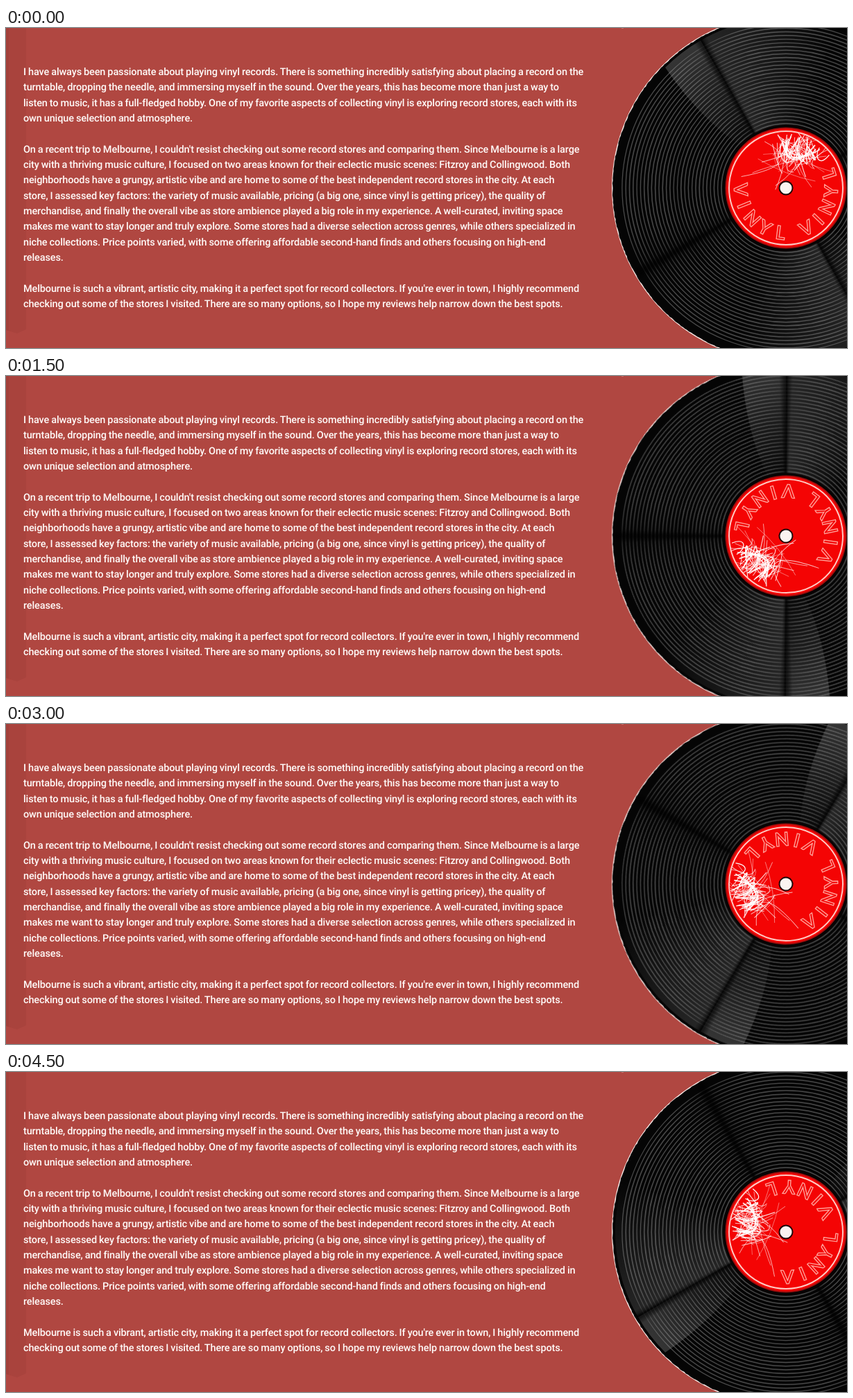
An HTML page with a canvas that plays this animation: 1212 by 462 pixels, repeating every 5000 ms.

```html
<!DOCTYPE html>
<html lang="en">
<head>
<meta charset="utf-8">
<title>Vinyl records</title>
<style>
  html, body { margin: 0; width: 100%; height: 100%; overflow: hidden; background: #b04741; }
  #stage { position: relative; width: 1212px; height: 462px; overflow: hidden; background: #b04741; }
  #page { position: absolute; left: 0; top: 0; }
  #copy text {
    font: 500 14.5px Roboto, "Liberation Sans", sans-serif;
    letter-spacing: -0.14px;
    word-spacing: -0.4px;
    text-rendering: geometricPrecision;
    fill: #fffaf8;
  }
  #disc { position: absolute; left: 871.5px; top: -21px; width: 504px; height: 504px; transform-origin: 252px 252px; }
  #disc > * { position: absolute; left: 0; top: 0; }
  #label text { font: 700 27px Lato, "Open Sans", sans-serif; fill: none; stroke: #ffa098; stroke-width: 1.4px; text-anchor: middle; }
</style>
</head>
<body>
<div id="stage">
  <svg id="page" width="1212" height="462">
    <path d="M0 0H29V435L16 441L0 436Z" fill="#a9433d"/>
    <path d="M0 0H4V437L0 436Z" fill="#a2403a"/>
    <path d="M887 0h3" stroke="#d99a94"/>
    <g id="copy"></g>
  </svg>
  <div id="disc">
    <canvas id="vinyl" width="504" height="504"></canvas>
    <svg id="label" width="504" height="504" viewBox="-252 -252 504 504">
      <clipPath id="inside"><circle r="82"/></clipPath>
      <circle r="87.5" fill="#a80c0c"/>
      <circle r="85.5" fill="#f40404"/>
      <g id="scratches" clip-path="url(#inside)" fill="none" stroke="#fff" stroke-linecap="round"></g>
      <circle r="82" fill="none" stroke="#ffc9c2" stroke-width="2"/>
      <g id="letters"></g>
      <circle r="10.5" fill="#1c0505"/>
      <circle r="8.6" fill="#fbf3f0"/>
    </svg>
  </div>
</div>
<script>
const LOOP = 5000, STEP = 500;
const RAD = Math.PI / 180;
const NS = "http://www.w3.org/2000/svg";
const $ = id => document.getElementById(id);

const COPY = `I have always been passionate about playing vinyl records. There is something incredibly satisfying about placing a record on the
turntable, dropping the needle, and immersing myself in the sound. Over the years, this has become more than just a way to
listen to music, it has a full-fledged hobby. One of my favorite aspects of collecting vinyl is exploring record stores, each with its
own unique selection and atmosphere.

On a recent trip to Melbourne, I couldn't resist checking out some record stores and comparing them. Since Melbourne is a large
city with a thriving music culture, I focused on two areas known for their eclectic music scenes: Fitzroy and Collingwood. Both
neighborhoods have a grungy, artistic vibe and are home to some of the best independent record stores in the city. At each
store, I assessed key factors: the variety of music available, pricing (a big one, since vinyl is getting pricey), the quality of
merchandise, and finally the overall vibe as store ambience played a big role in my experience. A well-curated, inviting space
makes me want to stay longer and truly explore. Some stores had a diverse selection across genres, while others specialized in
niche collections. Price points varied, with some offering affordable second-hand finds and others focusing on high-end
releases.

Melbourne is such a vibrant, artistic city, making it a perfect spot for record collectors. If you're ever in town, I highly recommend
checking out some of the stores I visited. There are so many options, so I hope my reviews help narrow down the best spots.`;

function add(parent, tag, attrs, text) {
  const el = document.createElementNS(NS, tag);
  for (const k in attrs) el.setAttribute(k, attrs[k]);
  if (text) el.textContent = text;
  parent.appendChild(el);
  return el;
}

function seeded(s) {
  return () => (s = (s * 16807) % 2147483647) / 2147483647;
}

function drawCopy() {
  COPY.split("\n").forEach((line, i) => {
    if (line) add($("copy"), "text", { x: 25, y: (68 + i * 22.33).toFixed(2) }, line);
  });
}

function drawVinyl() {
  const g = $("vinyl").getContext("2d");
  const rand = seeded(41);
  g.translate(252, 252);

  // stops: [degrees, alpha]
  const conic = (shade, stops) => {
    const fill = g.createConicGradient(0, 0, 0);
    for (const [deg, a] of stops) fill.addColorStop(deg / 360, `rgba(${shade},${shade},${shade},${a})`);
    return fill;
  };
  const disc = (r, fill) => {
    g.beginPath();
    g.arc(0, 0, r, 0, 7);
    g.fillStyle = fill;
    g.fill();
  };

  // slightly ragged white rim
  disc(251, "#f6e9e6");
  g.beginPath();
  for (let a = 0; a < 360; a += 0.8) {
    const r = 249.4 + rand() * 0.9;
    g.lineTo(r * Math.cos(a * RAD), r * Math.sin(a * RAD));
  }
  g.fillStyle = "#050505";
  g.fill();

  // grooves, dimmer towards the four dark bands
  const dips = [[0, .45]];
  for (const mid of [60, 150, 240, 330])
    dips.push([mid - 14, .45], [mid - 5, .34], [mid, .18], [mid + 5, .34], [mid + 14, .45]);
  g.strokeStyle = conic(155, [...dips, [360, .45]]);
  for (let r = 93; r < 238; r += 5.3) {
    g.lineWidth = 1.2 + 0.5 * rand();
    g.beginPath();
    g.arc(0, 0, r, 0, 7);
    g.stroke();
  }

  // two opposite sheens with a curved leading edge
  const polar = (r, deg) => [r * Math.cos(deg * RAD), r * Math.sin(deg * RAD)];
  const fade = g.createRadialGradient(0, 0, 90, 0, 0, 246);
  fade.addColorStop(0, "rgba(190,190,190,.02)");
  fade.addColorStop(.5, "rgba(190,190,190,.13)");
  fade.addColorStop(1, "rgba(190,190,190,.26)");
  for (const start of [45, 225]) {
    g.beginPath();
    g.moveTo(...polar(246, start));
    g.quadraticCurveTo(...polar(160, start - 6), ...polar(90, start - 2));
    g.lineTo(...polar(90, start + 15));
    g.arc(0, 0, 246, (start + 15) * RAD, start * RAD, true);
    g.fillStyle = fade;
    g.fill();
  }
  disc(246, conic(190, [
    [0, 0], [60, 0], [61, .18], [80, .11], [108, 0], [240, 0], [241, .18], [260, .11], [288, 0], [360, 0]
  ]));

  // dark bands
  const bands = [[0, 0]];
  for (const mid of [60, 150, 240, 330])
    bands.push([mid - 2.5, 0], [mid - .5, .55], [mid + .5, .55], [mid + 2.5, 0]);
  disc(248, conic(0, [...bands, [360, 0]]));
  disc(91, "#080404");
}

function drawLetters() {
  const angles = [178, 158, 138, 118, 97, 63, 44, 25, 4, -18];
  angles.forEach((a, i) => {
    add($("letters"), "text", { y: 9.7, transform: `rotate(${a - 90}) translate(0 65)` }, "VINYL"[i % 5]);
  });
}

function drawScratches() {
  const rand = seeded(977);
  const near = (mid, spread) => mid + (rand() - rand()) * spread;
  const stroke = (d, w, o) => add($("scratches"), "path", { d, "stroke-width": w.toFixed(2), opacity: o.toFixed(2) });

  // loose fine hairs
  for (let i = 0; i < 34; i++) {
    const x = near(12, 62), y = near(-66, 22);
    stroke(`M${x} ${y}Q${near(10, 50)} ${near(-46, 28)} ${near(x - 8, 46)} ${near(-28, 30)}`, .5 + rand() * .7, .45 + rand() * .4);
  }
  // dense looping core
  for (let i = 0; i < 18; i++) {
    const x = near(20, 44), y = near(-68, 16);
    stroke(`M${x} ${y}C${near(x - 6, 34)} ${near(-44, 24)} ${near(x + 10, 34)} ${near(-34, 20)} ${near(24, 42)} ${near(-60, 24)}`,
      .9 + rand() * 1.2, .7 + rand() * .3);
  }
  stroke("M-6 -72Q4 -40 -15 2", .9, .75);
  stroke("M-48 -22Q-10 -38 58 -46", .8, .7);
  stroke("M-40 -42Q0 -18 42 -10", .7, .6);
}

// the record turns in hard steps: two jumps, then ten degrees at a time
function angleAt(ms) {
  const i = Math.floor((ms % LOOP) / STEP);
  return i === 0 ? 0 : i === 1 ? 270 : 180 + 10 * i;
}

drawCopy();
drawVinyl();
drawLetters();
drawScratches();

const began = performance.now();
function tick() {
  $("disc").style.transform = `rotate(${angleAt(performance.now() - began)}deg)`;
  requestAnimationFrame(tick);
}
tick();
</script>
</body>
</html>
```
